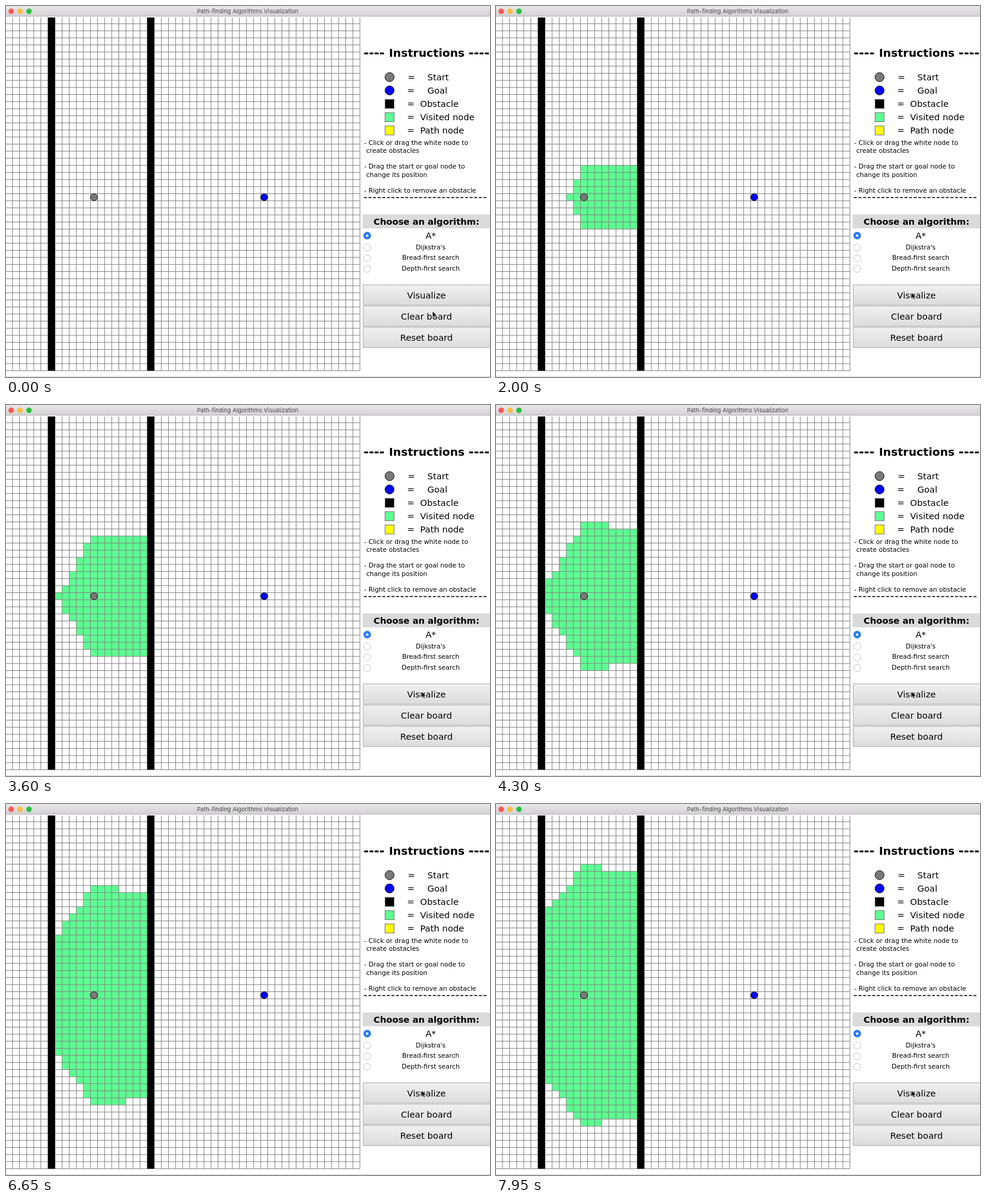
These frames come from a looping animation (800x614 px, 8 s). An HTML page:

```html
<!DOCTYPE html>
<html lang="en">
<head>
<meta charset="utf-8">
<title>Path-finding Algorithms Visualization</title>
<style>
  html, body { margin: 0; width: 100%; height: 100%; overflow: hidden; background: #fff; }
  svg { display: block; width: 100vw; height: 100vh; }
  text { font-family: "DejaVu Sans", Verdana, sans-serif; font-size: 14.5px; white-space: pre; }
  .mid { text-anchor: middle; }
  .small { font-size: 10.65px; }
  .bold { font-weight: bold; }
  .bar { font: 9.6px Inter, sans-serif; fill: #484848; }
</style>
</head>
<body>
<svg id="stage" viewBox="0 0 800 614">
  <defs>
    <linearGradient id="barFill" x2="0" y2="1">
      <stop stop-color="#e9e7e9"/><stop offset="1" stop-color="#d2d0d2"/>
    </linearGradient>
    <linearGradient id="buttonFill" x2="0" y2="1">
      <stop stop-color="#f0f0f0"/><stop offset="1" stop-color="#dcdcdc"/>
    </linearGradient>
  </defs>
  <rect width="800" height="614" fill="#fff"/>
  <path id="visited" fill="#5cff91"/>
  <path id="grid" fill="none" stroke="#828282"/>
  <g id="board"></g>
  <rect width="800" height="17" fill="url(#barFill)"/>
  <path d="M0 17H800" stroke="#b4b2b4"/>
  <path d="M0 613.5H800" stroke="#d4d4d4"/>
  <g id="panel"></g>
  <path id="cursor" d="M0 0V10L2.3 8L4 12L5.7 11.3L4.1 7.4H7.2Z" stroke="#fff" stroke-width=".7"/>
</svg>
<script>
const CELL = 11.72, LEFT = -1, TOP = 17.6, SIZE = 50;
const START = { col: 12, row: 25 }, GOAL = { col: 36, row: 25 };
const WALLS = [6, 20];
const STEP = 50, LOOP = 8000, FIRST_STEP = 14, NODES_PER_STEP = 3;

const $ = id => document.getElementById(id);
const colX = col => LEFT + col * CELL;
const rowY = row => TOP + row * CELL;

function add(parent, tag, attrs, content = "") {
  const node = document.createElementNS("http://www.w3.org/2000/svg", tag);
  for (const name in attrs) node.setAttribute(name, attrs[name]);
  node.textContent = content;
  $(parent).append(node);
}
const label = (x, y, content, cls = "", extra = {}) =>
  add("panel", "text", { x, y, class: cls, ...extra }, content);
const disc = (parent, cx, cy, r, fill, stroke = "none") =>
  add(parent, "circle", { cx, cy, r, fill, stroke });
const box = (parent, x, y, width, height, fill, stroke = "none") =>
  add(parent, "rect", { x, y, width, height, fill, stroke });

function drawBoard() {
  let d = "";
  for (let i = 1; i <= SIZE; i++) {
    d += `M${colX(i)} 19V${rowY(SIZE)}M0 ${rowY(i)}H${colX(SIZE)}`;
  }
  $("grid").setAttribute("d", d);
  for (const col of WALLS) box("board", colX(col), 19, CELL, rowY(SIZE) - 19, "#000");
  for (const [spot, fill] of [[START, "#7a7a7a"], [GOAL, "#0000ff"]]) {
    disc("board", colX(spot.col + .5), rowY(spot.row + .5), 5.8, fill, "#111");
  }
}

function drawPanel() {
  ["#fc5753", "#fdbc40", "#28c03d"].forEach((fill, i) => disc("panel", 8.6 + i * 14.7, 8.7, 4.5, fill));
  label(399.5, 12.4, "Path-finding Algorithms Visualization", "bar mid");

  label(695.5, 84, "Instructions", "bold mid", { style: "font-size:18.5px" });
  for (const x of [591, 764.5]) label(x, 85, "----", "bold", { style: "font-size:20.9px" });

  disc("panel", 634, 117.7, 7.5, "#7a7a7a", "#111");
  disc("panel", 634, 139.7, 7.5, "#0000ff", "#111");
  ["#000", "#5cff91", "#ffff00"].forEach((fill, i) =>
    box("panel", 626.5, 154.5 + i * 22, 15, 15, fill, "#777"));
  ["Start", "Goal", "Obstacle", "Visited node", "Path node"].forEach((name, i) => {
    const y = 123 + i * 22;
    label(i ? 669 : 670, y, "=", "mid");
    label(i < 2 ? 696.5 : 684.5, y, name);
  });

  [[592, 229.5, "- Click or drag the white node to"], [595.5, 242.5, "create obstacles"],
   [592, 269, "- Drag the start or goal node to"], [595.5, 282.5, "change its position"],
   [592, 308.7, "- Right click to remove an obstacle"]]
    .forEach(([x, y, line]) => label(x, y, line, "small"));
  add("panel", "path", { d: "M591.5 317H796", stroke: "#000", "stroke-width": 1.7, "stroke-dasharray": "5 2.6" });

  box("panel", 589.5, 345, 211, 23, "#dadada");
  label(695, 361.7, "Choose an algorithm:", "bold mid");
  [[384.5, 380, "A*"], [402.7, 399.7, "Dijkstra's"],
   [420.3, 417.5, "Bread-first search"], [438, 435, "Depth-first search"]]
    .forEach(([y, dotY, name], i) => {
      label(702, y, name, i ? "mid small" : "mid");
      disc("panel", 597, dotY, 5.8, i ? "#fff" : "#2b7df6", i ? "#c4c4c4" : "#1f70ec");
    });
  disc("panel", 597, 380, 2.1, "#fff");

  ["Visualize", "Clear board", "Reset board"].forEach((name, i) => {
    const y = 461.5 + i * 35.2;
    box("panel", 590.5, y, 212, 33.4, "url(#buttonFill)", "#adadad");
    label(695, y + 22, name, "mid");
  });
}

// A* with a straight-line heuristic visits the corridor's nodes in order of f = g + h.
function searchOrder() {
  const nodes = [];
  for (let row = 0; row < SIZE; row++) {
    for (let col = WALLS[0] + 1; col < WALLS[1]; col++) {
      const g = Math.abs(col - START.col) + Math.abs(row - START.row);
      const h = Math.hypot(col - GOAL.col, row - GOAL.row);
      nodes.push({ col, row, g, f: g + h });
    }
  }
  return nodes.sort((a, b) => a.f - b.f || a.g - b.g || b.row - a.row);
}

const order = searchOrder();

function visitedCount(time) {
  const steps = Math.max(0, time / STEP - FIRST_STEP);
  const repeats = time > 5000 ? 1 : 0; // one node is expanded twice
  return steps * NODES_PER_STEP - repeats;
}

function render(time) {
  const d = order.slice(0, visitedCount(time))
    .map(n => `M${colX(n.col)} ${rowY(n.row)}h${CELL}v${CELL}h${-CELL}z`).join("");
  $("visited").setAttribute("d", d);

  const p = Math.min(1, Math.max(0, (time - 50) / 450));
  const ease = p * p * (3 - 2 * p);
  $("cursor").setAttribute("transform", `translate(${705 - 18 * ease} ${505 - 31 * ease})`);
}

drawBoard();
drawPanel();
const began = performance.now();
let shown = -1;
function tick() {
  const time = Math.floor((performance.now() - began) % LOOP / STEP) * STEP;
  if (time !== shown) render(shown = time);
  requestAnimationFrame(tick);
}
tick();
</script>
</body>
</html>
```
